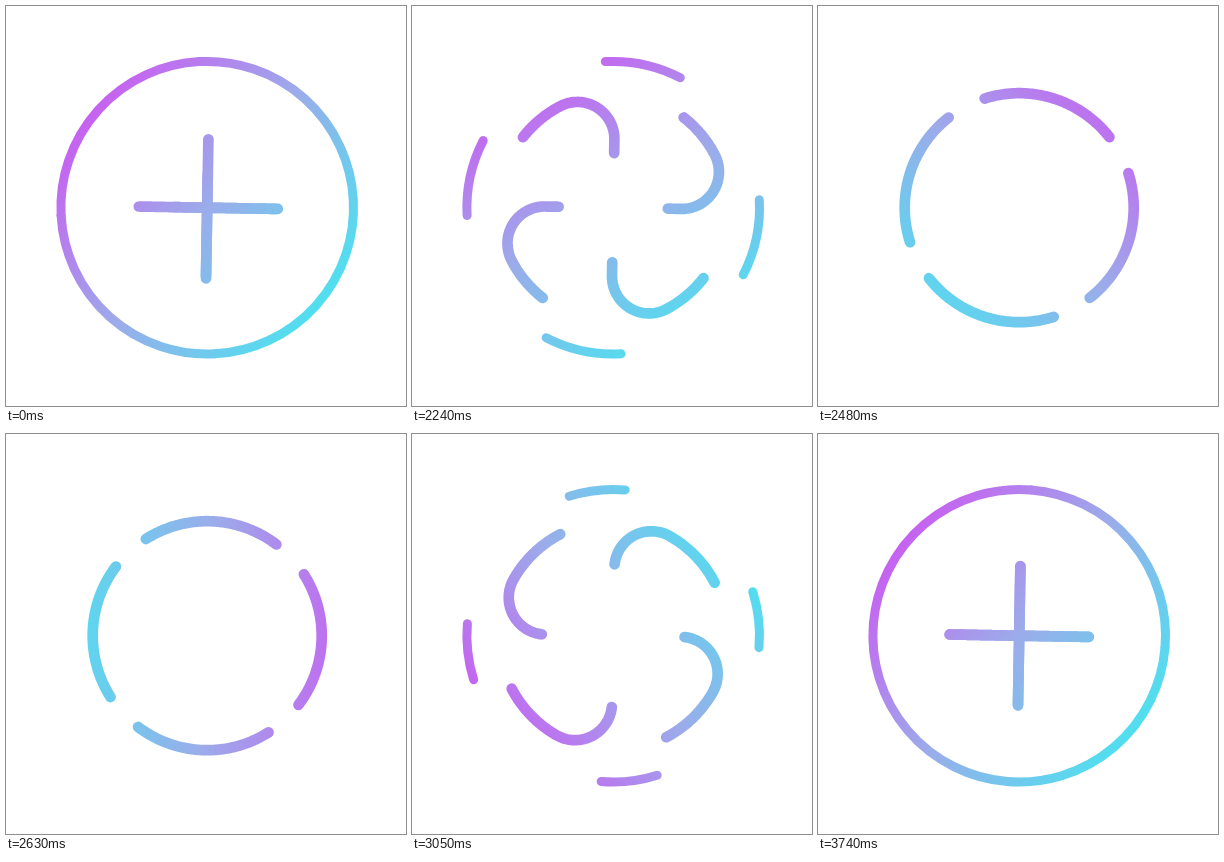
Recreate the animation shown at these times as an HTML page with a canvas. Size 400 by 400 pixels, loop 3.89 s.

```html
<!DOCTYPE html>
<html lang="en">
<head>
<meta charset="utf-8">
<title>Plus and ring loop</title>
<style>
  html, body { margin: 0; width: 100%; height: 100%; overflow: hidden; background: #fff; }
  canvas { display: block; width: 400px; height: 400px; }
</style>
</head>
<body>
<canvas id="stage" width="400" height="400"></canvas>
<script>
const ctx = document.getElementById('stage').getContext('2d');
const LOOP = 3890, HOLD = 2030, STEP = 30, LAST = 58;
const CX = 201.2, CY = 201.7;
const RAD = Math.PI / 180;

// Stroke route: straight arm, fillet, inner ring, fillet, straight arm.
const RING = 114.5, FILLET = 37;
const ARM = Math.sqrt((RING - FILLET) ** 2 - FILLET ** 2);
const JOIN = Math.atan2(FILLET, ARM);
const BEND = (Math.PI / 2 + JOIN) * FILLET;
const SWEEP = (Math.PI - 2 * JOIN) * RING;
const LENGTH = 139, TILT = 1 * RAD;
const OUTER = 146.3;

// Tables of [step, value]
const TRAVEL = [[0, 0], [1, 17], [8, 123], [16, 234], [27, 297], [35, 393],
                [41, 451], [47, 495], [53, 525], [58, 534]];
const TURN = [[0, -142], [8, -120], [16, -47], [27, 65], [35, 143],
              [44, 190], [52, 214], [58, 218]];
const SHRINK = [[0, 90], [1, 84], [8, 30.4], [12, 0]];
const GROW = [[32, 0], [35, 22.2], [40, 54], [46, 79], [53, 90]];

// Monotone cubic interpolation through a table
function ease(table, x) {
  const end = table.length - 1;
  if (x <= table[0][0]) return table[0][1];
  if (x >= table[end][0]) return table[end][1];
  const slope = i => (table[i + 1][1] - table[i][1]) / (table[i + 1][0] - table[i][0]);
  const tangent = i => {
    if (i === 0) return slope(0);
    if (i === end) return slope(end - 1);
    const a = slope(i - 1), b = slope(i);
    return a * b <= 0 ? 0 : 2 * a * b / (a + b);
  };
  let i = 0;
  while (x > table[i + 1][0]) i++;
  const [x0, y0] = table[i], [x1, y1] = table[i + 1];
  const w = x1 - x0, u = (x - x0) / w, v = 1 - u;
  return y0 * v * v * (1 + 2 * u) + y1 * u * u * (3 - 2 * u)
    + w * u * v * (v * tangent(i) - u * tangent(i + 1));
}

// Point on the route; zero is where the upward arm starts to bend.
function routePoint(s) {
  if (s < 0) return [0, -ARM - s];
  if (s < BEND) {
    const a = -s / FILLET;
    return [-FILLET + FILLET * Math.cos(a), -ARM + FILLET * Math.sin(a)];
  }
  if (s < BEND + SWEEP) {
    const a = -Math.PI / 2 - JOIN - (s - BEND) / RING;
    return [RING * Math.cos(a), RING * Math.sin(a)];
  }
  // The way back in mirrors the way out.
  const [x, y] = routePoint(2 * BEND + SWEEP - s);
  return [x, -y];
}

function drawStroke(tail, head, angle) {
  const c = Math.cos(angle), n = Math.sin(angle);
  const count = Math.max(1, Math.ceil((head - tail) / 1.5));
  ctx.beginPath();
  for (let i = 0; i <= count; i++) {
    const [x, y] = routePoint(tail + (head - tail) * i / count);
    ctx.lineTo(CX + x * c - y * n, CY + x * n + y * c);
  }
  ctx.stroke();
}

function drawOuter(step) {
  const closing = step > 20;
  const size = ease(closing ? GROW : SHRINK, step);
  if (size <= 0) return;
  ctx.lineWidth = 9;
  for (let k = 0; k < 4; k++) {
    const start = (closing ? -85.3 - size : -93.1) + k * 90;
    ctx.beginPath();
    ctx.arc(CX, CY, OUTER, start * RAD, (start + size) * RAD);
    ctx.stroke();
  }
}

function drawInner(step) {
  const head = ease(TRAVEL, step) + 2.5;
  const tail = head - LENGTH;
  // Two of the strokes emerge late from behind the others.
  const lag = Math.min(37, Math.max(0, 37 * (6 - step) / 5));
  ctx.lineWidth = 10.7;
  for (let k = 0; k < 4; k++) {
    const late = k === 0 || k === 3;
    drawStroke(tail, head - (late ? lag : 0), k * Math.PI / 2 + TILT);
  }
}

function paint(step) {
  const turn = ease(TURN, step) * RAD;
  const dx = 150 * Math.cos(turn), dy = 150 * Math.sin(turn);
  const tint = ctx.createLinearGradient(CX + dx, CY + dy, CX - dx, CY - dy);
  tint.addColorStop(0, '#c662f0');
  tint.addColorStop(0.5, '#9bacea');
  tint.addColorStop(1, '#50dfef');
  ctx.fillStyle = '#fff';
  ctx.fillRect(0, 0, 400, 400);
  ctx.strokeStyle = tint;
  ctx.lineCap = ctx.lineJoin = 'round';
  drawOuter(step);
  drawInner(step);
}

const begin = performance.now();
function tick() {
  const t = (performance.now() - begin) % LOOP;
  const step = t < HOLD ? 0 : Math.min(LAST, Math.floor((t - HOLD) / STEP) + 1);
  paint(step);
  requestAnimationFrame(tick);
}
tick();
</script>
</body>
</html>
```
